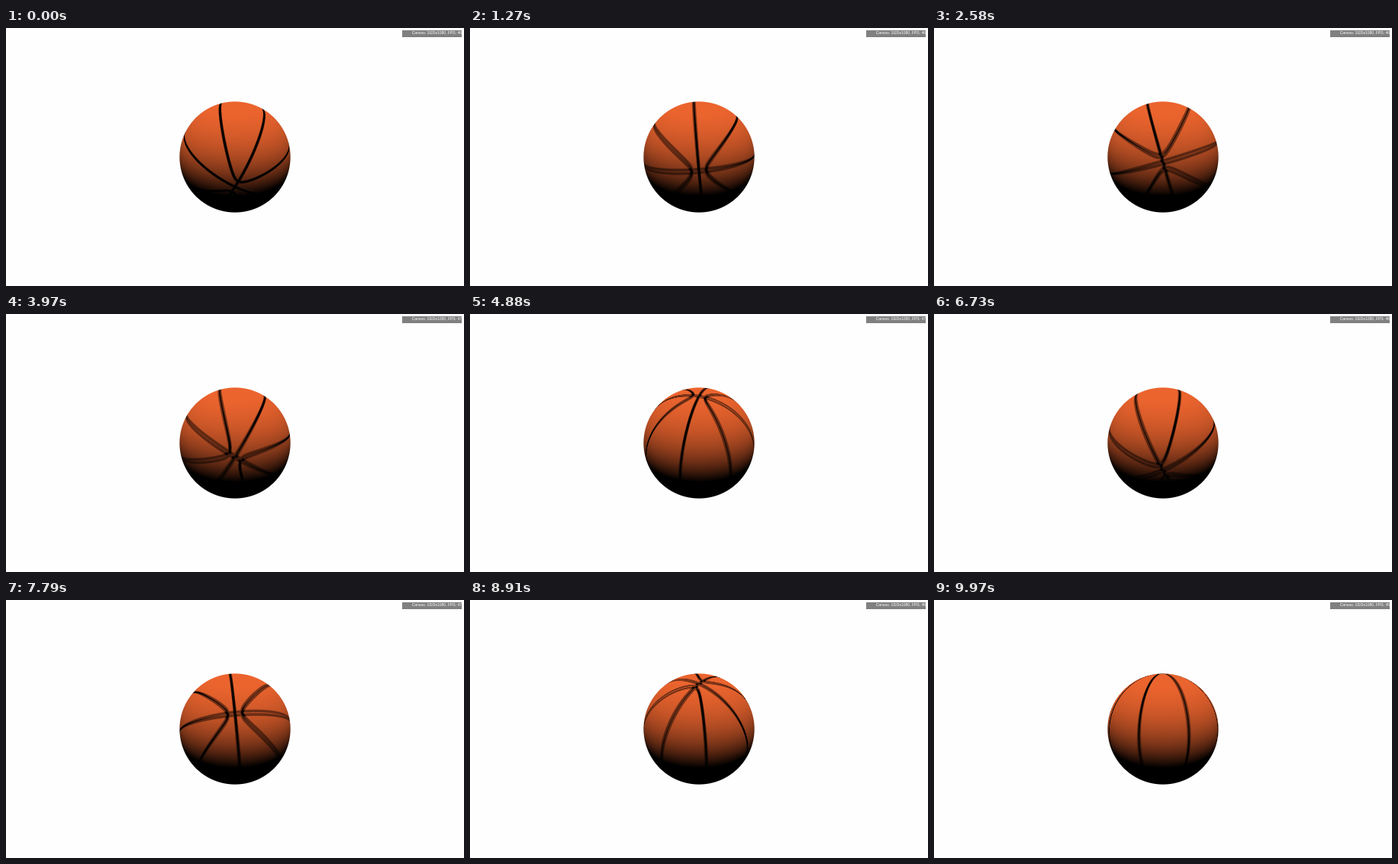
Recreate the animation shown at these times as an HTML page with a canvas. Size 600 by 338 pixels, loop 10 s.

```html
<!DOCTYPE html>
<html lang="en">
<head>
<meta charset="utf-8">
<title>Spinning basketball</title>
<style>
  html, body { margin: 0; width: 100%; height: 100%; overflow: hidden; background: #fefefe; }
  canvas { position: absolute; left: 225px; top: 94px; }
  #stats {
    position: absolute; left: 519px; top: 3px; width: 78px; height: 9px;
    background: #808080; color: #fff; text-align: right; white-space: nowrap;
    font: 5px/7.5px Arial, "Liberation Sans", sans-serif;
  }
</style>
</head>
<body>
<canvas id="ball" width="150" height="150"></canvas>
<div id="stats"></div>
<script>
const LOOP = 10000;
const SIZE = 150, CENTER = 75, RADIUS = 72.6;
const CAMERA = 4.5;                                  // distance in ball radii
const FOCAL = RADIUS * Math.sqrt(CAMERA * CAMERA - 1);
const COLOR = [235, 100, 46];
const SEAM = 0.021, SOFT = 0.007;                    // half width and edge softness
const GAP = 0.1, FLARE = 1.053 ** 2;                 // shape of the curved seam
const DEG = Math.PI / 180;

// seconds, tumble in degrees
const TUMBLE = [[0, 116.2], [1.27, 282.1], [2.58, 456.3], [3.97, 642.1], [7.8, 1157.2], [9.97, 1449.3]];
const SPIN_RATIO = -0.399, SPIN_START = 61;
const STEP = 0.05 / DEG;                             // turn between two blended poses
// seconds, frame rate shown
const RATES = [[0, 46], [3.8, 47], [5.8, 46], [6.8, 47], [8.8, 46], [9.8, 45]];

const ctx = document.getElementById("ball").getContext("2d");
const stats = document.getElementById("stats");
const image = ctx.createImageData(SIZE, SIZE);
const clamp = v => Math.min(1, Math.max(0, v));

// Surface normal and brightness for every pixel of the ball
function buildSurface() {
  const points = [];
  for (let j = 0; j < SIZE; j++) {
    for (let i = 0; i < SIZE; i++) {
      const px = i + 0.5 - CENTER, py = CENTER - j - 0.5;
      const alpha = clamp(RADIUS + 0.5 - Math.hypot(px, py));
      if (!alpha) continue;
      const u = px / FOCAL, v = py / FOCAL, m = 1 + u * u + v * v;
      const disc = Math.max(0, CAMERA ** 2 - m * (CAMERA ** 2 - 1));
      const k = (CAMERA - Math.sqrt(disc)) / m;
      const x = u * k, y = v * k, z = CAMERA - k;
      const light = 0.6 * y + 0.26 * z + 0.145;
      points.push({ at: (j * SIZE + i) * 4, x, y, z, alpha, shade: clamp(1.13 * Math.tanh(1.9 * light)) });
    }
  }
  return points;
}
const surface = buildSurface();

function tumbleAt(s) {
  let n = 1;
  while (n < TUMBLE.length - 1 && s > TUMBLE[n][0]) n++;
  const [t0, a0] = TUMBLE[n - 1], [t1, a1] = TUMBLE[n];
  return a0 + (a1 - a0) * (s - t0) / (t1 - t0);
}

function makePose(tumble) {
  const a = tumble * DEG;
  const b = (SPIN_START + SPIN_RATIO * (tumble - TUMBLE[0][1])) * DEG;
  return { ca: Math.cos(a), sa: Math.sin(a), cb: Math.cos(b), sb: Math.sin(b) };
}

// Amount of black seam at a point: two great circles and the curved pair
function seamAt(p, pose) {
  const depth = p.z * pose.ca - p.y * pose.sa;
  const x = p.x * pose.cb - depth * pose.sb;
  const z = p.x * pose.sb + depth * pose.cb;
  const q = x * x - FLARE * z * z;
  const slope = 2 * Math.sqrt(Math.max(1e-6, x * x + FLARE * FLARE * z * z - q * q));
  const curve = Math.abs(q - GAP * GAP) / slope;
  const dist = Math.min(Math.abs(x), Math.abs(z), curve);
  return clamp((SEAM + SOFT - dist) / (2 * SOFT));
}

function draw(s) {
  const tumble = tumbleAt(s), half = s > 0 ? STEP / 2 : 0;
  const before = makePose(tumble - half), after = makePose(tumble + half);
  for (const p of surface) {
    const seam = (seamAt(p, before) + seamAt(p, after)) / 2;
    const lit = p.shade * (1 - 0.96 * seam);
    for (let c = 0; c < 3; c++) image.data[p.at + c] = COLOR[c] * lit;
    image.data[p.at + 3] = 255 * p.alpha;
  }
  ctx.putImageData(image, 0, 0);
  const rate = RATES.filter(r => r[0] <= s).pop()[1];
  stats.textContent = "Canvas: 1920x1080, FPS: " + rate;
}

const start = performance.now();
let shown = -1;
function tick() {
  const t = Math.max(0, performance.now() - start) % LOOP;
  // 30 pictures a second, shown on a 33 per second clock
  const slot = Math.floor(t * 0.033 + 0.15);
  const picture = Math.min(299, Math.floor(slot / 1.1 + 0.41));
  if (picture !== shown) draw((shown = picture) / 30);
  requestAnimationFrame(tick);
}
tick();
</script>
</body>
</html>
```
